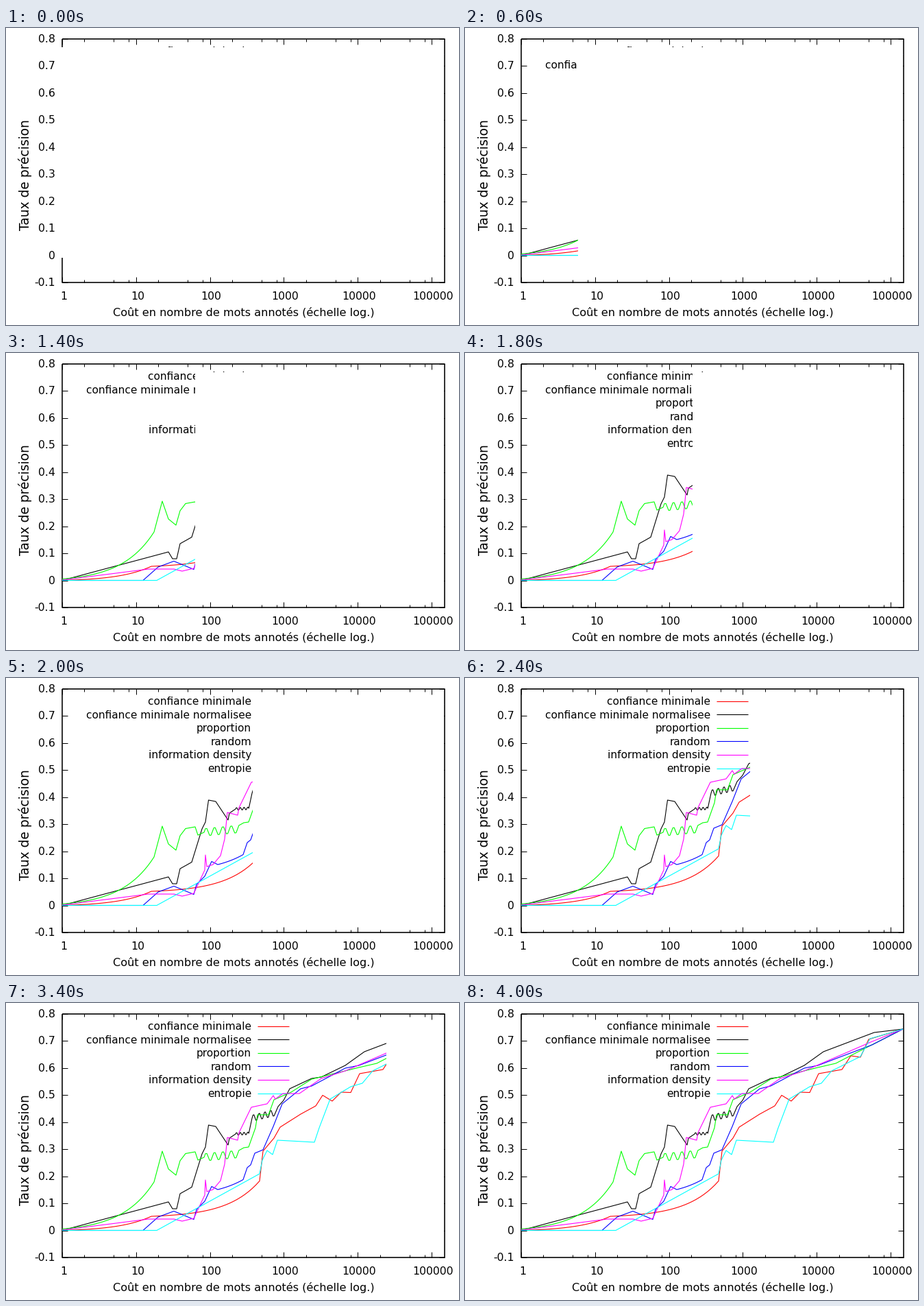
These frames come from a looping animation (661 by 433 pixels, 4.2 s). A matplotlib script:

```python
import numpy as np
import matplotlib.pyplot as plt
from matplotlib.animation import FuncAnimation
from matplotlib.patches import Rectangle

W, H, DPI = 661, 433, 64
PX = 72 / DPI  # points per pixel
LEFT, RIGHT, TOP, BOTTOM = 82, 640, 16, 371
DECADE = 107.8
ZERO = 331.5
END = (639, 38)
FRAMES, INTERVAL = 21, 200

plt.rcParams["font.family"] = "DejaVu Sans"
fig = plt.figure(figsize=(W / DPI, H / DPI), dpi=DPI, facecolor="white")
ax = fig.add_axes([0, 0, 1, 1])
ax.set_xlim(0, W)
ax.set_ylim(H, 0)
ax.axis("off")


def line(xs, ys, color="black", width=1.0, z=2):
    ax.plot(xs, ys, color=color, lw=width * PX, zorder=z,
            solid_capstyle="butt", solid_joinstyle="round")


def label(x, y, text, size=15.4, ha="center", **kw):
    ax.text(x, y, text, fontsize=size * PX, ha=ha, va="baseline",
            color="black", zorder=3, **kw)


def growth(x0, y0, x1, y1):
    """Segment that is straight in cost, so it bends on the log axis."""
    xs = np.linspace(x0, x1, 30)
    rate = np.log(10) / DECADE
    t = np.expm1(rate * (xs - x0)) / np.expm1(rate * (x1 - x0))
    return list(zip(xs, y0 + (y1 - y0) * t))


def ripple(x0, y0, x1, y1, height, period):
    """Segment that swings around a straight line."""
    xs = np.arange(x0, x1, period / 6)
    base = np.interp(xs, [x0, x1], [y0, y1])
    return list(zip(xs, base - height * np.sin(2 * np.pi * (xs - x0) / period)))


def curve(row, name, color, points):
    line(*zip(*points, END), color, 1.1, z=4 + row / 10)
    y = 33.5 + 19.6 * row
    label(358, y + 5.5, name, ha="right")
    line([367, 413], [y, y], color, 1.1)


def axes():
    line([LEFT, RIGHT, RIGHT, LEFT, LEFT],
         [TOP, TOP, BOTTOM, BOTTOM, TOP], width=1.6)
    for i in range(10):
        y = TOP + i * (BOTTOM - TOP) / 9
        label(71.5, y + 5, f"{(8 - i) / 10:g}", 15.7, ha="right")
        line([LEFT, LEFT + 8], [y, y])
        line([RIGHT - 8, RIGHT], [y, y])
    for decade in range(6):
        for m in (1, 2, 5, 8):
            x = LEFT + DECADE * (decade + np.log10(m))
            if x > RIGHT:
                break
            size = 8 if m == 1 else 4
            line([x, x], [TOP, TOP + size])
            line([x, x], [BOTTOM - size, BOTTOM])
        label(LEFT + DECADE * decade + 2, 396, str(10 ** decade), 15.8)
    label(346.5, 420, "Coût en nombre de mots annotés (échelle log.)", 16.1)
    label(34, 214, "Taux de précision", 18.6, rotation=90,
          rotation_mode="anchor")


axes()

curve(0, "con\ufb01ance minimale", "#ff0000", [
    *growth(82, ZERO, 212, 311), *growth(212, 311, 370, 259.5),
    (375, 216), (391, 197), (400, 181), (430, 162), (452, 150), (462, 134.5),
    (476, 143), (489, 130), (503, 130.5), (516, 103), (550, 97), (563, 77),
    (577, 79), (589, 53)])

curve(1, "con\ufb01ance minimale normalisee", "#000000", [
    (82, ZERO), (237, 290), (243, 300), (249, 300), (254, 278), (271, 268.5),
    (286, 220), (291, 210), (295.5, 178), (306, 180), (324, 207), (326, 197),
    *ripple(335, 191, 355, 190, 2, 5.5),
    *ripple(359, 168, 392, 160, 5, 8.4),
    (397, 151), (405, 142), (414, 125), (446, 110), (460, 108), (495, 91),
    (523, 71), (597, 43)])

curve(2, "proportion", "#00ff00", [
    *growth(82, 329.5, 216, 261),
    (228, 216), (237, 242), (248, 251), (254, 230), (262, 219.5), (276, 217),
    (280, 229), *ripple(289, 225, 341, 220, 6, 12.2),
    (347, 211), (354, 210), (364, 182), (367, 163), (383, 163), (391, 141),
    (416, 130), (446, 111), (515, 94), (541, 88), (570, 73)])

curve(3, "random", "#0000ff", [
    (82, ZERO), (200, ZERO), (222, 312), (245, 303.5), (274, 315.5),
    (278, 301), (290, 289), (300, 267.5), *growth(309, 272, 346, 257.5),
    (352, 240), (357, 236), (363, 219), (375, 214), (390, 180), (403, 147),
    (430, 125), (446, 121), (495, 95), (515, 91), (594, 61)])

curve(4, "information density", "#ff00ff", [
    (82, 331), (208, 315), (245, 315), (257, 318), (274, 314), (290, 280),
    (291, 258), (293, 275), (302, 272), (313, 259), (319, 235), (323, 196),
    (338, 200), (340, 189), (358, 152), (381, 147), (390, 135), (393, 140),
    (404, 132), (428, 132), (460, 110), (495, 99), (592, 57)])

curve(5, "entropie", "#00ffff", [
    (82, ZERO), (220, ZERO), (370, 249), (374, 229), (381, 215), (389, 221),
    (396, 200), (450, 203), (457, 182), (473, 140), (503, 122), (520, 117),
    (535, 99), (577, 78), (591, 52)])

cover = ax.add_patch(Rectangle((81, 28), 558, 307, facecolor="white",
                               edgecolor="none", antialiased=False, zorder=9))


def update(frame):
    """Uncover the plot from left to right."""
    x = 81 + 28 * frame - frame // 7
    cover.set_x(x)
    cover.set_width(639 - x)
    cover.set_visible(x < 639)
    return [cover]


anim = FuncAnimation(fig, update, frames=FRAMES, interval=INTERVAL,
                     repeat=True, repeat_delay=0, blit=False)
plt.show()
```
